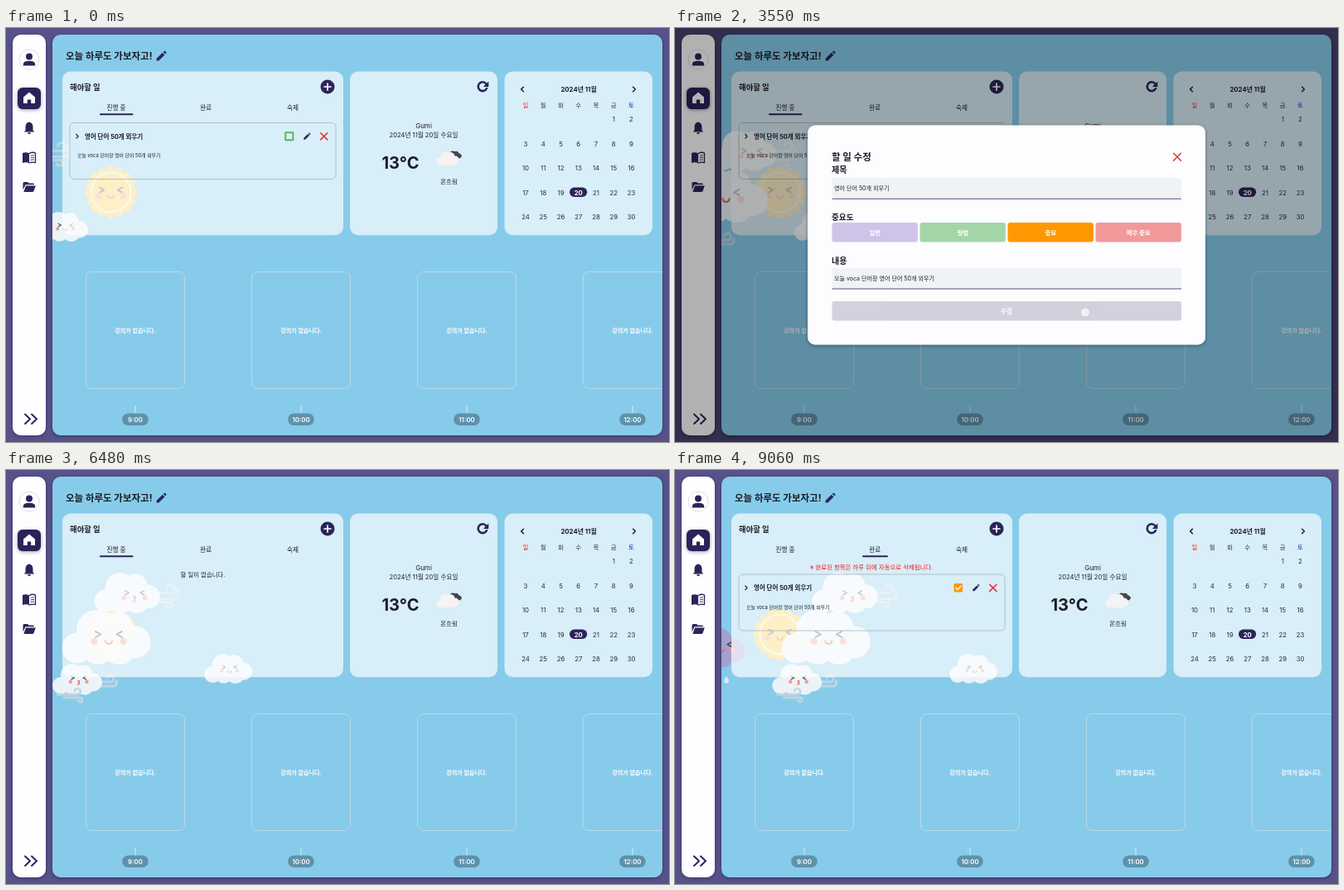
An HTML page that plays this animation: 800x500 px, repeating every 9.09 s.

```html
<!DOCTYPE html>
<html lang="ko">
<head>
<meta charset="utf-8">
<title>할 일 관리</title>
<style>
html, body { margin: 0; width: 100%; height: 100%; overflow: hidden; background: #57538a; }
svg { display: block; width: 800px; height: 500px; }
text { font-family: Inter, 'Noto Sans CJK KR', 'Noto Sans CJK', sans-serif; fill: #1d1d24; }
.line { fill: none; stroke-linecap: round; stroke-linejoin: round; }
</style>
</head>
<body>
<svg id="stage" viewBox="0 0 800 500" xmlns="http://www.w3.org/2000/svg"></svg>
<script>
const LOOP = 9090;
const NAVY = '#2c2459', GREEN = '#4caf50', ORANGE = '#ff9800', RED = '#e53935';
const TASK = '영어 단어 50개 외우기', NOTE = '오늘 voca 단어장 영어 단어 50개 외우기';

// ---- markup helpers ----
const tag = (name, attrs, inner = '') =>
  `<${name} ${Object.entries(attrs).map(([k, v]) => `${k}="${v}"`).join(' ')}>${inner}</${name}>`;
const rect = (x, y, width, height, rx, fill, more = {}) =>
  tag('rect', { x, y, width, height, rx, fill, ...more });
const circle = (cx, cy, r, fill) => tag('circle', { cx, cy, r, fill });
const line = (d, stroke, width, more = {}) =>
  tag('path', { d, class: 'line', stroke, 'stroke-width': width, ...more });
const shape = (d, fill) => tag('path', { d, fill });
const text = (s, x, y, size, weight = 400, fill = '#1d1d24', anchor = 'start') =>
  tag('text', { x, y, 'font-size': size, 'font-weight': weight, style: `fill:${fill}`, 'text-anchor': anchor }, s);
const mid = (s, x, y, size, weight, fill) => text(s, x, y, size, weight, fill, 'middle');
const group = (id, inner, more = {}) => tag('g', { id, ...more }, inner);
const at = (x, y, inner, scale = 1) => tag('g', { transform: `translate(${x} ${y}) scale(${scale})` }, inner);

// ---- icons ----
const pencil = (x, y, s) => at(x, y,
  shape('M-6 6V3L2-5L5-2L-3 6ZM3-6L4-7Q5-7.6 5.8-6.8L6.8-5.8Q7.6-5 7-4L6-3Z', NAVY), s);
const cross = (x, y, r, color, w) =>
  line(`M${x - r} ${y - r}l${2 * r} ${2 * r}m0 ${-2 * r}l${-2 * r} ${2 * r}`, color, w);
const chevron = (x, y, r, dir, w, color = '#1d1d24') =>
  line(`M${x - dir * r / 2} ${y - r}l${dir * r} ${r}l${-dir * r} ${r}`, color, w);

// ---- weather characters ----
const BUMPS = [[-12, -9, 24], [13, -11, 20], [34, 6, 19.5], [-35, 13, 18.5], [-10, 14, 19], [16, 13, 20]];
const puff = fill => BUMPS.map(b => circle(...b, fill)).join('');
const SMILE = 'M-4 3q0 4 4 4t4-4', KISS = 'M-2 2q5-1 3 2.5q-1 1-2 1q4 1 2 3.5q-1.5 1.5-4 .5';
const face = (x, y, mouth, s = 1) => at(x, y,
  circle(-17.5, 4, 4, '#f79b8f') + circle(17.5, 4, 4, '#f79b8f') +
  line('M-16-8l6.5 3.5l-6.5 3.5M16-8l-6.5 3.5l6.5 3.5', '#41414b', 1.9) +
  line(mouth, '#e5634e', 1.9), s);
const cloud = (scale, mouth, fill = '#f2f6fa') =>
  at(0, 0, tag('g', { opacity: .94 }, puff(fill)) + face(3, 1, mouth), scale);
const wind = d => line(d, '#c4d6e1', 3, { opacity: .9 });

function sun() {
  let dots = '';
  for (let i = 0; i < 16; i++) {
    const a = i * Math.PI / 8;
    dots += circle((27 * Math.cos(a)).toFixed(2), (27 * Math.sin(a)).toFixed(2), 4.8, '#fbd050');
  }
  return dots + circle(0, 0, 28, '#fbd050') + circle(0, 0, 25, '#f3efcf') +
    circle(0, 0, 23, '#fbd050') + face(0, 1, SMILE, .85);
}

const clouds = {
  small: { y: 240, x: t => 70 + 27 * t + .553 * t * t, art: cloud(.54, SMILE) },
  big: { y: 202, x: t => -6.8 + 16.85 * t + .444 * t * t, art: cloud(1, SMILE) },
  gust: { y: 148.5, x: t => 14.5 + 18.5 * t + .28 * t * t,
    art: wind('M34 0H53a5 5 0 1 0-5-6M34 7H57q5 0 5-6q-1-6-6-5M40 11H50a3.5 3.5 0 1 1-3 5') +
      cloud(.74, KISS) + face(9, 3, KISS, .72) },
  breeze: { y: 253, x: t => -41.8 + 16.85 * t + .444 * t * t,
    art: wind('M24 3H40a4 4 0 1 0-4-5M26 8H44q4-1 3-6') + cloud(.56, KISS) +
      wind('M-24 18H0a3.5 3.5 0 1 0-3-4.5M-16 22H4a2.5 2.5 0 1 1-3 3') },
  rain: { y: 214, x: t => 44 + 20 * (t - 9.06),
    art: at(0, 0, puff('#a59fce') + face(16, 0, SMILE), .75) +
      shape('M18 35q6 7 0 9q-6-2 0-9ZM-6 35q6 7 0 9q-6-2 0-9Z', '#d5eaf7') },
};
clouds.gust.art = clouds.gust.art.replace(face(3, 1, KISS), '');

// ---- page parts ----
function sidebar() {
  return rect(8, 8, 40, 484, 10, '#fefdff', { filter: 'url(#shade)' }) +
    tag('circle', { cx: 28, cy: 38, r: 12, fill: '#fff', stroke: '#dcdce4', 'stroke-width': 1 }) +
    circle(28, 34.5, 4, NAVY) + shape('M20.8 45.5v-1.5q0-4.2 7.2-4.2t7.2 4.2v1.5Z', NAVY) +
    rect(14, 72, 28, 26, 6, NAVY, { filter: 'url(#shade)' }) +
    shape('M28 77.5l7 6v7.5h-4.8v-4.5h-4.4v4.5h-4.8v-7.5Z', '#fff') +
    shape('M28 113.5q4.5 1 4.5 6v4l1.8 2H21.7l1.8-2v-4q0-5 4.5-6ZM26 126.3h4q-.5 2-2 2t-2-2Z', NAVY) +
    shape('M28 151.5v11.5q-4-1.5-8 0v-12q4-1.5 8 .5Z', NAVY) +
    line('M28 151.5q4-2.2 7.5-.5v11.6q-4-1.3-7.5.4', NAVY, 1.3) +
    line('M30 154.2q2-.8 3.6-.4M30 156.8q2-.8 3.6-.4M30 159.4q2-.8 3.6-.4', NAVY, .9) +
    shape('M20.5 187.5q0-1.5 1.5-1.5h4l1.5 1.5h5q1.5 0 1.5 1.8h-10.5l-3 6.2ZM24 190.5h11.8l-2.3 6.5q-.4 1-1.5 1H21.3Z', NAVY) +
    line('M23 466.5l6 5.7l-6 5.7M31 466.5l6 5.7l-6 5.7', NAVY, 2);
}

function weather() {
  return line('M580.3 69.2A5.4 5.4 0 1 0 580 73', NAVY, 2.6) + shape('M582.3 64.5v6.5h-6.5Z', NAVY) +
    mid('Gumi', 504, 121, 8) + mid('2024년 11월 20일 수요일', 504, 131.8, 7.6) +
    mid('13°C', 476, 170.3, 20, 700) +
    at(541, 153.5, puff('#45454e'), .155) + at(545, 154, puff('#45454e'), .09) +
    at(533, 158, puff('#f5f3f3'), .26) + mid('온흐림', 534.5, 187.6, 7.4);
}

function calendar() {
  const col = i => 627 + 21.25 * i;
  let out = mid('2024년 11월', 691, 77, 7.8, 700) +
    chevron(623, 74, 2.8, -1, 1.5) + chevron(758, 74, 2.8, 1, 1.5);
  [...'일월화수목금토'].forEach((d, i) => {
    out += mid(d, col(i), 95.6, 7.4, 400, i === 0 ? '#f02020' : i === 6 ? '#2424a8' : '#33333c');
  });
  out += rect(680, 192.5, 21.2, 11.5, 5.7, NAVY);
  for (let d = 1; d <= 30; d++) {
    const cell = d + 4, today = d === 20;
    out += mid(d, col(cell % 7), 113 + 29.5 * Math.floor(cell / 7), 7.8, today ? 700 : 400, today ? '#fff' : '#2a2a33');
  }
  return out;
}

function lectures() {
  let out = '';
  for (let i = 0; i < 4; i++) {
    const x = 156 + 200 * i;
    out += rect(x - 59.5, 294.5, 119, 141, 7, 'none', { stroke: '#c3dbe6', 'stroke-opacity': .85 }) +
      mid('강의가 없습니다.', x, 368, 7.1, 700, '#fff') +
      rect(x - .5, 456, 1, 9, 0, '#d8ecf6') + rect(x - 15.8, 465.5, 31.6, 14.5, 7.2, '#5e92aa') +
      mid(`${9 + i}:00`, x, 475.7, 7.8, 600, '#fff');
  }
  return out;
}

function task() {
  const tick = rect(336.5, 125.5, 10.5, 10.5, 1.5, ORANGE) + line('M339 131l2 2l4-4.2', '#fff', 1.4);
  return tag('rect', { id: 'frame', x: 77, y: 114.5, width: 321, height: 68, rx: 5, fill: 'none', stroke: '#a9b3bb', 'stroke-width': .8 }) +
    chevron(86, 130.8, 2.3, 1, 1.2) + text(TASK, 95, 133.6, 7.5, 700) +
    group('open', rect(337, 126, 9.5, 9.5, .5, 'none', { stroke: 'currentColor', 'stroke-width': 1.4 }) +
      rect(338, 127, 7.5, 7.5, 0, 'none', { stroke: 'currentColor', 'stroke-width': .8, 'stroke-dasharray': '.9 .9' })) +
    group('done', tick) +
    group('tools', pencil(363, 131, .62) + cross(383.8, 130.8, 4.1, '#ea2b2b', 1.5)) +
    group('note', text(NOTE, 86, 156, 5.85));
}

const LEVELS = [['일반', '#cfc4e8'], ['평범', GREEN], ['중요', ORANGE], ['매우 중요', RED]];
function modal() {
  const field = (y, s) => rect(189.5, y, 421.5, 25, 2, '#f0f3f6') +
    rect(189.5, y + 24.5, 421.5, 1, 0, '#57538a') + text(s, 192, y + 15, 7.05);
  const buttons = LEVELS.map(([s, color], i) => {
    const x = 189.5 + 106 * i;
    return tag('rect', { id: 'level' + i, x, y: 235, width: 103.4, height: 23.5, rx: 3, fill: color }) +
      mid(s, x + 51.7, 249.7, 7.4, 700, '#fff');
  }).join('');
  return rect(160, 117.5, 480, 265, 9, '#fdfcff', { filter: 'url(#shade)' }) +
    text('할 일 수정', 189, 160.2, 11.5, 700) + cross(606, 155.7, 4.4, '#cf4b48', 1.6) +
    text('제목', 189, 175.4, 10, 700) + field(181.3, TASK) +
    text('중요도', 189, 231.8, 9.6, 700) + buttons +
    text('내용', 189, 284.6, 10, 700) + field(290, NOTE) +
    group('submit', rect(189.5, 330, 421.5, 23.6, 3, NAVY) + mid('수정', 400, 344.7, 7.6, 700, '#fff'));
}

const cards = [[68, 339], [415, 178], [601.5, 178.5]]
  .map(([x, w]) => rect(x, 52.5, w, 197.7, 10, '#fff', { 'fill-opacity': .68 })).join('');
const stage = document.getElementById('stage');
stage.innerHTML = `<defs>
  <filter id="shade" x="-20%" y="-20%" width="140%" height="140%">
    <feDropShadow dx="0" dy="1" stdDeviation="2" flood-color="#0c0a28" flood-opacity=".4"/></filter>
  <clipPath id="panel"><rect x="56" y="8" width="736" height="484" rx="10"/></clipPath></defs>` +
  rect(0, 0, 800, 500, 0, '#57538a') + group('rim', rect(0, 0, 800, 500, 0, '#000')) + sidebar() +
  rect(56, 8, 736, 484, 10, '#87cbea', { filter: 'url(#shade)' }) +
  tag('g', { 'clip-path': 'url(#panel)' },
    at(126.5, 198.5, sun()) +
    ['small', 'gust', 'big', 'breeze', 'rain'].map(k => group(k, clouds[k].art)).join('') +
    cards + lectures()) +
  text('오늘 하루도 가보자고!', 72, 37.6, 11.5, 700) + pencil(187, 34.2, .9) +
  text('해야할 일', 77, 74.6, 9.4, 700) +
  circle(388, 71, 8.5, NAVY) + line('M388 67v8M384 71h8', '#fff', 1.7) +
  mid('진행 중', 133, 98.6, 7.6, 500) + mid('완료', 241.3, 98.6, 7.6, 500) + mid('숙제', 346, 98.6, 7.6, 500) +
  tag('rect', { id: 'bar', y: 103.3, height: 2, rx: 1, fill: NAVY }) +
  group('empty', mid('할 일이 없습니다.', 237.5, 129, 7.4)) +
  group('notice', mid('※ 완료된 항목은 하루 뒤에 자동으로 삭제됩니다.', 237, 120.3, 7.4, 400, '#f01c1c')) +
  group('task', task()) + weather() + calendar() +
  group('dim', rect(0, 0, 800, 500, 0, '#000', { 'fill-opacity': .3 })) + group('modal', modal()) +
  tag('circle', { id: 'touch', r: 5.5, fill: '#f4f4f8', 'fill-opacity': .85, stroke: '#c6c6d0', 'stroke-width': .8 });

// ---- timeline ----
const TIME = { show: 1200, pick: 2680, hide: 3660, check: 5800, tab: 6900, expand: 8240 };
const FADE = 270;
const TAPS = [[1080, 363, 131], [2600, 453, 247], [3500, 495, 343.5], [5680, 341.5, 131], [6800, 241, 96], [8110, 88.5, 145]];
const TAP_LENGTH = 120;

const parts = {};
stage.querySelectorAll('[id]').forEach(e => parts[e.id] = e);
const set = (id, attrs) => { for (const k in attrs) parts[id].setAttribute(k, attrs[k]); };
const show = (id, on) => set(id, { visibility: on ? 'inherit' : 'hidden' });
const ramp = (t, start, length) => Math.min(1, Math.max(0, (t - start) / length));
// Dips to the pressed opacity while a finger is down, then recovers.
const press = (t, start, low) => 1 - (1 - low) * (ramp(t, start, 40) - ramp(t, start + TAP_LENGTH, 90));

function render(t) {
  for (const k in clouds) set(k, { transform: `translate(${clouds[k].x(t / 1000).toFixed(2)} ${clouds[k].y})` });

  const veil = ramp(t, TIME.show, FADE) - ramp(t, TIME.hide, FADE);
  set('dim', { opacity: veil });
  set('rim', { opacity: veil * .2 });
  set('modal', { opacity: veil });
  const chosen = t < TIME.pick ? 1 : 2;
  LEVELS.forEach((_, i) => set('level' + i, { 'fill-opacity': i === 0 || i === chosen ? 1 : .5 }));
  set('submit', { opacity: press(t, TAPS[2][0], .2) });

  const done = t >= TIME.tab, wide = !done || t >= TIME.expand;
  set('bar', done ? { x: 226, width: 31 } : { x: 113, width: 40.5 });
  show('empty', t >= TIME.check && !done);
  show('notice', done);
  show('task', t < TIME.check || done);
  set('task', {
    transform: `translate(0 ${done ? 11.5 : 0})`,
    opacity: done ? press(t, TAPS[5][0], .3) : 1,
  });
  set('frame', { height: wide ? 68 : 31 });
  show('note', wide);
  show('tools', wide);
  show('open', !done);
  show('done', done);
  set('open', { color: t < TIME.hide ? '#3fb53f' : ORANGE });

  const tap = TAPS.find(([s]) => t >= s && t < s + TAP_LENGTH);
  show('touch', !!tap);
  if (tap) set('touch', { cx: tap[1], cy: tap[2] });
}

const begin = performance.now();
function tick() {
  render((performance.now() - begin) % LOOP);
  requestAnimationFrame(tick);
}
tick();
</script>
</body>
</html>
```
